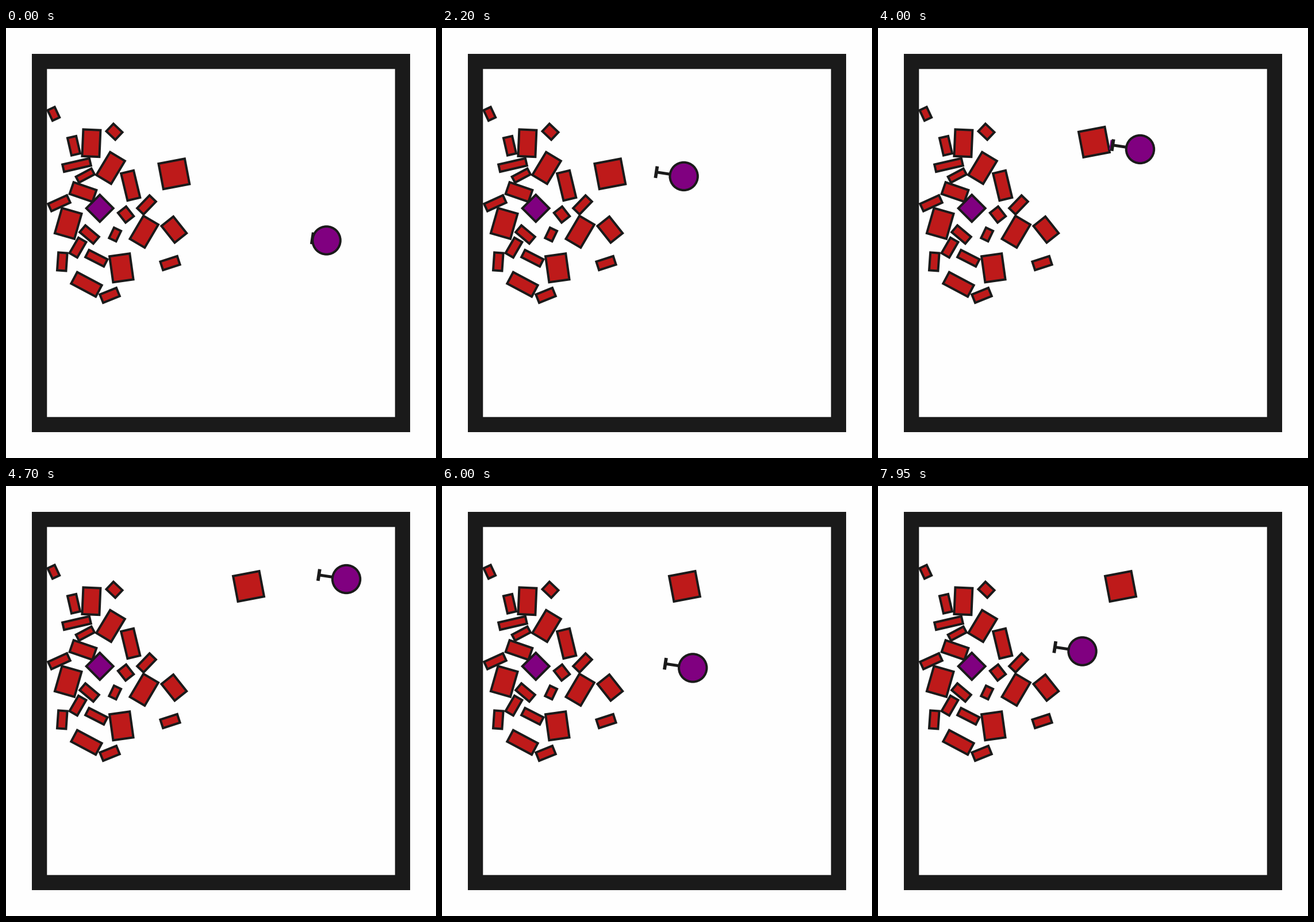
A matplotlib script for the animation above (8000 ms loop, 748 by 748 pixels).

```python
import numpy as np
import matplotlib.pyplot as plt
from matplotlib.animation import FuncAnimation
from matplotlib.patches import Circle, Polygon, Rectangle

SIZE, DPI = 748, 100
STEP, LOOP = 50, 8000
DARK, RED, PURPLE, PAPER = "#1a1a1a", "#be1a1a", "#800080", "#fefefe"
EDGE = 4
LINE = EDGE * 72 / DPI

GRIP, RELEASE = 3150, 4250      # ms, while the block is carried
EXTEND = 600                    # ms, time the arm takes to slide out
ARM_IN, ARM_OUT = 24.5, 48.3
CARRY = np.array([-80, -12.5])
TILT = np.radians(8.6)
OUT = -np.array([np.cos(TILT), np.sin(TILT)])

# Legs of the drive; each is a smooth curve through (ms, x, y) waypoints.
START, FACE = (0, 557.5, 369.5), (2550, 397, 243.6)
PICK, RETURN = (3450, 360, 277.6), (5950, 438, 317.3)
LEGS = [
    np.array([START, (1000, 490.5, 332.5), (1700, 453, 281.6), FACE]),
    np.array([FACE, PICK]),
    np.array([PICK, (4250, 502, 187), (4700, 592, 162),
              (5100, 549.5, 226), RETURN]),
    np.array([RETURN, (6800, 408, 302.6), (7950, 355.5, 287.5)]),
]

# (length, thickness) of a kind of block: x, y, direction of each one
BLOCKS = {
    (50.5, 34): [(148.4, 200.3, 92.5), (182, 243.5, 121), (240.2, 354.4, 120.5)],
    (49.5, 39.5): [(108.2, 340, 106), (200.8, 417.3, 82)],
    (52.5, 26.5): [(216.7, 274, 76.5), (140, 446, 28)],
    (46, 25.5): [(134, 285.3, 19)],
    (41, 30.5): [(292.3, 350.7, 51.5)],
    (35, 19.5): [(118, 204.8, 77), (244.5, 307.7, -46), (145, 359.2, 40),
                 (125, 382, 120), (97.8, 406.5, 94), (285.5, 409, -18),
                 (180.5, 465, -22)],
    (40, 18): [(92.5, 304.8, -24.5), (157.3, 400.5, 27)],
    (34.5, 15.5): [(137.8, 256.7, -28)],
    (52, 17): [(123, 238.4, -13)],
    (25.5, 22): [(188.5, 180.5, 43.5), (208.5, 324.5, 52)],
    (24, 17.5): [(82.8, 149.3, 65), (189.7, 359.2, 115.5)],
}


def hermite(ms, t, v):
    i = min(np.searchsorted(t, ms, "right") - 1, len(t) - 2)
    h, slope = t[i + 1] - t[i], np.gradient(v, t)
    s = (ms - t[i]) / h
    return (v[i] * (1 + 2 * s) * (1 - s) ** 2 + v[i + 1] * s * s * (3 - 2 * s)
            + h * s * (1 - s) * (slope[i] * (1 - s) - slope[i + 1] * s))


def body_at(ms):
    t, x, y = [leg for leg in LEGS if leg[0, 0] <= ms][-1].T
    return np.array([hermite(ms, t, x), hermite(ms, t, y)])


def block_at(ms):
    return body_at(np.clip(ms, GRIP, RELEASE)) + CARRY


def corners(centre, w, h, angle):
    c, s = np.cos(angle), np.sin(angle)
    pts = np.array([(-w, -h), (w, -h), (w, h), (-w, h)]) / 2
    return pts @ np.array([(c, s), (-s, c)]) + centre


def box(x, y, w, h, deg, color=RED):
    xy = corners((x, y), w - EDGE, h - EDGE, np.radians(deg))
    return ax.add_patch(Polygon(xy, fc=color, ec=DARK, lw=LINE,
                                joinstyle="miter"))


def bar(color):
    return ax.add_patch(Polygon(np.zeros((4, 2)), fc=color, lw=0))


def square(half, color):
    ax.add_patch(Rectangle((SIZE / 2 - half,) * 2, 2 * half, 2 * half,
                           fc=color, lw=0, snap=False))


fig = plt.figure(figsize=(SIZE / DPI, SIZE / DPI), dpi=DPI, facecolor=PAPER)
ax = fig.add_axes([0, 0, 1, 1])
ax.set_xlim(0, SIZE)
ax.set_ylim(SIZE, 0)
ax.axis("off")

square(329, DARK)
square(302.7, PAPER)
for (length, thick), places in BLOCKS.items():
    for x, y, deg in places:
        box(x, y, length, thick, deg)
box(163.2, 313.6, 37.2, 37.2, 45, PURPLE)

block = box(0, 0, 50.3, 49, -10.8)
block_shape = block.get_xy()[:4].copy()
arm, suction, gripper = bar(DARK), bar(PURPLE), bar(DARK)
body = ax.add_patch(Circle((0, 0), 24.2, fc=PURPLE, ec=DARK, lw=LINE))


def draw(i):
    ms = i * STEP
    pos = body_at(ms)
    reach = ARM_IN + (ARM_OUT - ARM_IN) * min(ms / EXTEND, 1)
    block.set_xy(block_shape + block_at(ms))
    arm.set_xy(corners(pos + OUT * reach / 2, reach, 5, TILT))
    gripper.set_xy(corners(pos + OUT * reach, 5.8, 20.5, TILT))
    suction.set_xy(corners(pos + OUT * (reach + 3.4), 3, 17, TILT))
    suction.set_visible(GRIP <= ms <= RELEASE)
    body.center = pos
    return block, arm, suction, gripper, body


anim = FuncAnimation(fig, draw, frames=LOOP // STEP, interval=STEP,
                     init_func=lambda: draw(0), repeat=True, repeat_delay=0)
plt.show()
```
